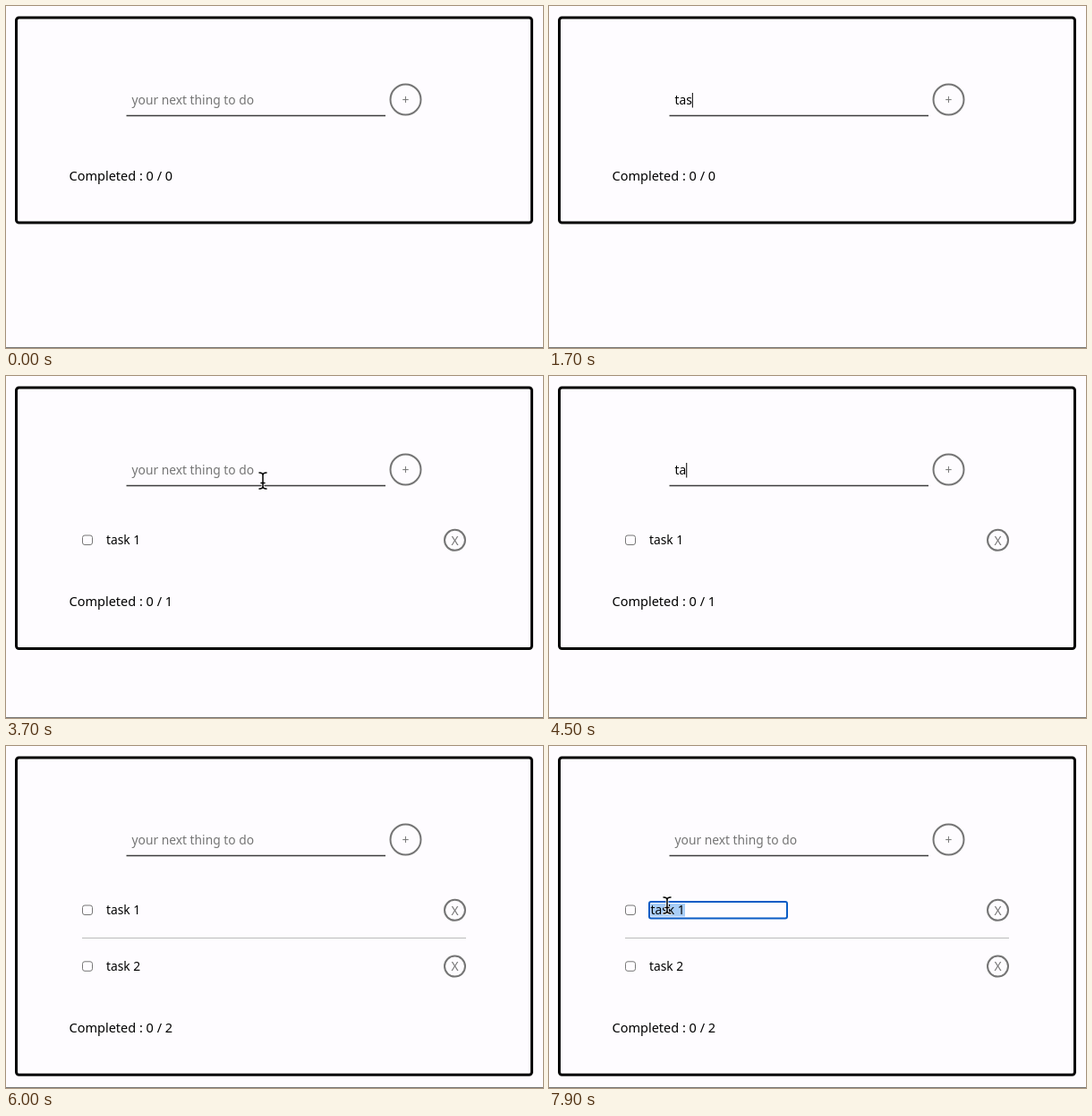
Recreate the animation shown at these times as an HTML page. Size 600 px wide and 382 px high, loop 8000 ms.

```html
<!DOCTYPE html>
<html lang="en">
<head>
<meta charset="utf-8">
<title>To-do list</title>
<style>
  html, body { margin: 0; width: 100%; height: 100%; overflow: hidden; background: #fefcff; }
  svg { display: block; width: 600px; height: 382px; fill: none; }
  text { font: 500 13.8px "Noto Sans", "Open Sans", sans-serif; fill: #000; white-space: pre; }
  .gray { fill: #757575; }
  .ring { stroke: #757575; stroke-width: 2; }
  .mid { text-anchor: middle; }
  #count { font-size: 14.5px; }
</style>
</head>
<body>
<svg viewBox="0 0 600 382">
  <path d="M0 381.5H600" stroke="#777"/>
  <rect id="panel" x="11.5" y="13" width="576" height="229" rx="3" stroke="#000" stroke-width="3"/>
  <path d="M134.5 122.5H424" stroke="#3c3c3c" stroke-width="1.3"/>
  <circle class="ring" cx="446.5" cy="104.5" r="17"/>
  <text class="gray mid" x="446.5" y="110">+</text>
  <text id="field" x="140.5" y="110"></text>

  <g id="row1">
    <rect x="85.5" y="178" width="11" height="10.5" rx="2.5" stroke="#767676"/>
    <circle class="ring" cx="501.5" cy="183.3" r="11.5"/>
    <text class="gray mid" x="501.5" y="188.5">X</text>
  </g>
  <g id="row2">
    <path d="M85 214.5H514" stroke="#bbb"/>
    <use href="#row1" y="62.8"/>
    <text x="112" y="251">task 2</text>
  </g>
  <rect id="edit" x="112" y="174" width="154" height="18.5" rx="2"/>
  <rect id="selection" x="113.5" y="176" width="38.5" height="14.5" fill="#a8cdf7"/>
  <text id="task1" y="188">task 1</text>
  <text id="count" x="70.5"></text>
  <path id="caret" stroke="#000"/>

  <g id="beam" stroke-linecap="round">
    <path id="beamShape" d="M-4 -9Q0 -9 0 -6Q0 -9 4 -9M0 -6V6M-4 9Q0 9 0 6Q0 9 4 9M-2 2.5H2" stroke="#fff" stroke-width="3"/>
    <path d="M-4 -9Q0 -9 0 -6Q0 -9 4 -9M0 -6V6M-4 9Q0 9 0 6Q0 9 4 9M-2 2.5H2" stroke="#000" stroke-width="1.5"/>
  </g>
  <path id="arrow" d="M0 0V15L3.5 12L6 17.5L8.5 16.5L6 11H11Z" fill="#000" stroke="#fff"/>
</svg>
<script>
const $ = id => document.getElementById(id);
const LOOP = 8000, ROW = 62.6;

const typing = [
  { text: 'task 1', keys: [1400, 1500, 1700, 1900, 2200, 2800], enter: 3200 },
  { text: 'task 2', keys: [4400, 4500, 4700, 4900, 5200, 5500], enter: 6000 }
];

// Pointer paths: each ends when the pointer hides; points are [time, x, y].
const paths = [
  { end: 1400, points: [[100, 383, 343], [300, 320, 200], [600, 266, 117]] },
  { end: 4400, points: [[3500, 14, 278], [3600, 170, 180], [3700, 287, 117], [3900, 281, 120]] },
  { end: LOOP, points: [[6300, 14, 343], [6500, 214, 206], [6800, 137, 175], [7100, 132, 178]] }
];

const show = (id, on) => $(id).style.display = on ? '' : 'none';

function pointerAt(t) {
  const path = paths.find(p => t >= p.points[0][0] && t < p.end);
  if (!path) return null;
  const pts = path.points;
  const i = pts.findIndex(p => p[0] > t);
  if (i < 0) return pts[pts.length - 1].slice(1);
  const [a, b] = [pts[i - 1], pts[i]];
  const k = (t - a[0]) / (b[0] - a[0]);
  return [a[1] + (b[1] - a[1]) * k, a[2] + (b[2] - a[2]) * k];
}

function drawField(t) {
  const job = typing.find(j => t >= j.keys[0] && t < j.enter);
  const typed = job ? job.text.slice(0, job.keys.filter(k => k <= t).length) : '';
  const field = $('field');
  field.textContent = typed || 'your next thing to do';
  field.setAttribute('class', typed ? '' : 'gray');

  // The caret blinks every half second, counted from the last key press.
  const presses = [700, ...typing[0].keys, ...typing[1].keys].filter(k => k <= t);
  const since = t - presses[presses.length - 1];
  const editing = t >= 7500 && t < 7600;
  show('caret', editing || (t >= 700 && t < 7100 && since % 1000 < 500));
  const x = 141 + (typed ? field.getComputedTextLength() : 0);
  $('caret').setAttribute('d', editing ? 'M152.5 175.5V191' : `M${x} 97V113.5`);
}

function drawList(t) {
  const rows = typing.filter(j => t >= j.enter).length;
  $('panel').setAttribute('height', 229 + rows * ROW);
  $('count').setAttribute('y', 194.5 + rows * ROW);
  $('count').textContent = `Completed : 0 / ${rows}`;
  show('row1', rows > 0);
  show('task1', rows > 0);
  show('row2', rows > 1);

  const focused = t >= 7500;
  show('edit', t >= 7200);
  $('edit').setAttribute('stroke', focused ? '#0b5cc5' : '#767676');
  $('edit').setAttribute('stroke-width', focused ? 2 : 1);
  show('selection', t >= 7600);
  $('task1').setAttribute('x', t >= 7200 ? 113.5 : 112);
}

function drawPointer(t) {
  const at = pointerAt(t);
  const inField = at && at[0] > 134 && at[0] < 424 && at[1] > 88 && at[1] < 123;
  const onTask = at && at[0] > 111 && at[0] < 152 && at[1] > 172 && at[1] < 194;
  const text = inField || onTask;
  show('beam', at && text);
  show('arrow', at && !text);
  if (at) $(text ? 'beam' : 'arrow').setAttribute('transform', `translate(${at})`);
}

function frame(now) {
  const t = Math.floor(now % LOOP / 100) * 100;
  drawField(t);
  drawList(t);
  drawPointer(t);
  requestAnimationFrame(frame);
}
requestAnimationFrame(frame);
</script>
</body>
</html>
```
